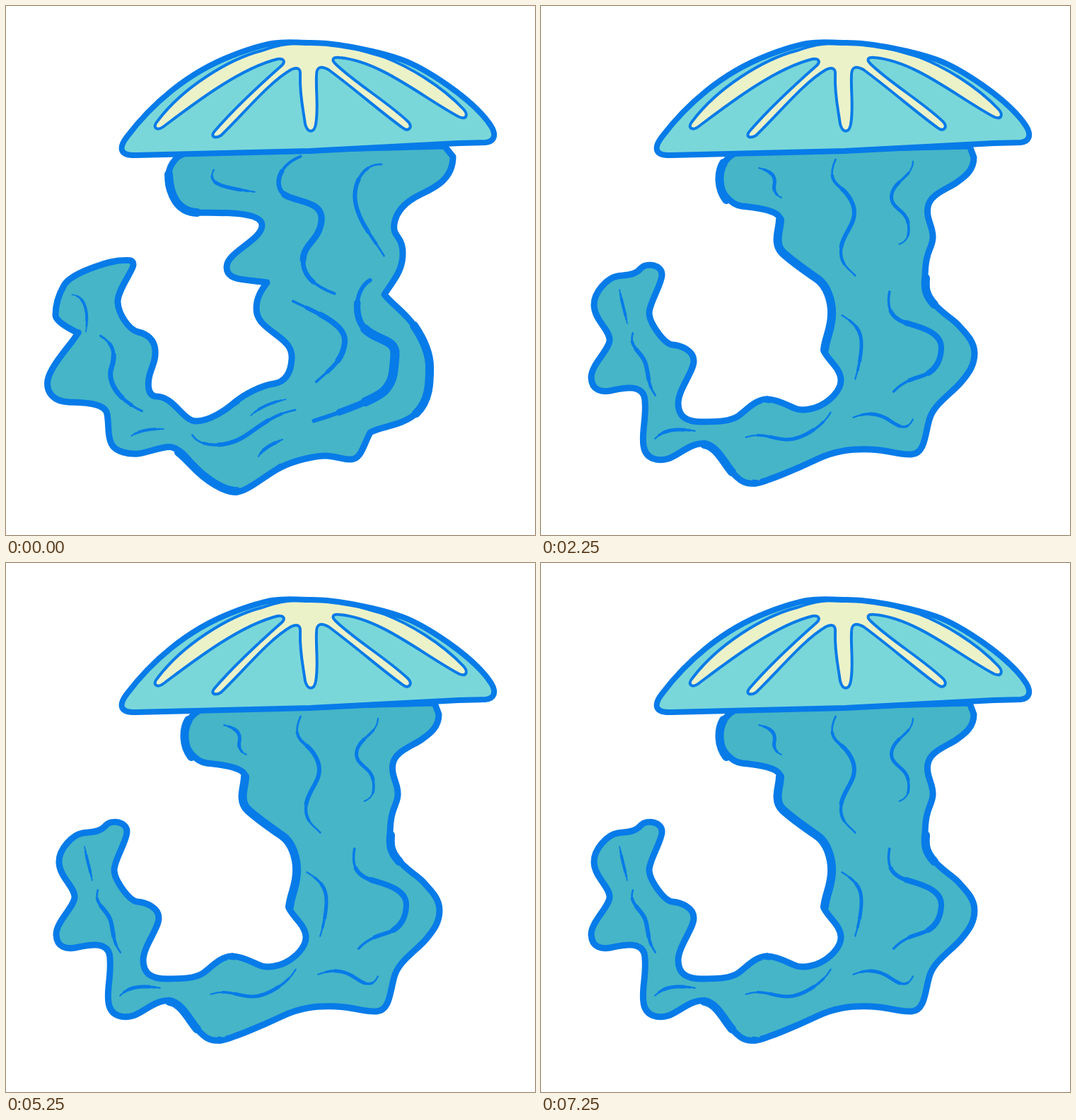
Recreate the animation shown at these times as an HTML page without scripts. Size 748 by 748 pixels, loop 7.5 s.

```html
<!DOCTYPE html>
<html lang="en">
<head>
<meta charset="utf-8">
<title>Jellyfish</title>
<style>
  html, body { margin: 0; width: 100%; height: 100%; overflow: hidden; background: #fff; }
  svg { display: block; width: 100%; height: 100%; }
  path { stroke: #077be8; stroke-linejoin: round; stroke-linecap: round; }
  .body { fill: #46b5c7; stroke-width: 9; }
  .seam { stroke: #46b5c7; stroke-width: 11; stroke-linecap: butt; }
  .heavy { fill: none; stroke-width: 12; }
  .bell { fill: #7ad7d9; }
  .rays { fill: #ecf2c8; stroke-width: 4; }
  .rim { fill: none; stroke-width: 8; }

  /* Folds taper: each line is stacked from thin and long to thick and short. */
  .folds path {
    fill: none;
    stroke-width: calc(var(--w) * var(--k) * 1px);
    stroke-dasharray: var(--len) calc(100 - var(--len));
    stroke-dashoffset: calc((var(--len) - 100) / 2);
  }
  .thin { --k: .45; --len: 99; }
  .mid { --k: .72; --len: 74; }
  .thick { --k: 1; --len: 48; }

  .pose { animation: swap 500ms step-end infinite; }
  .second { animation-delay: -250ms; }
  @keyframes swap { 0% { opacity: 1; } 50%, 100% { opacity: 0; } }
</style>
</head>
<body>
<svg viewBox="0 0 748 748">
  <defs>
    <path id="dome" d="M184 211C162 212 158 202 171 185C205 140 255 95 320 70S395 52 432 52S530 65 560 76S660 130 686 170C694 183 690 192 678 193L640 194L430 205Z"/>
    <g id="folds-a" class="folds">
      <path pathLength="100" style="--w:5" d="M294 231C284 250 300 256 352 263"/>
      <path pathLength="100" style="--w:9" d="M418 212C382 226 378 258 396 268S449 276 446 304S420 336 420 360S440 398 466 407"/>
      <path pathLength="100" style="--w:6" d="M532 224C506 222 490 250 494 277S514 320 535 354"/>
      <path pathLength="100" style="--w:8" d="M405 417C440 434 482 450 479 476S458 514 438 532"/>
      <path pathLength="100" style="--w:13" d="M516 387C494 398 490 438 507 456S552 470 550 494S548 530 536 543S470 576 434 587"/>
      <path pathLength="100" style="--w:4" d="M93 408C112 410 117 432 113 461"/>
      <path pathLength="100" style="--w:7" d="M133 466C154 478 155 495 149 512S156 556 193 573"/>
      <path pathLength="100" style="--w:4" d="M177 608C190 599 208 598 223 598"/>
      <path pathLength="100" style="--w:6" d="M263 606C275 626 314 624 338 608S378 577 410 571"/>
      <path pathLength="100" style="--w:4" d="M346 579C360 566 378 560 396 556"/>
      <path pathLength="100" style="--w:5" d="M357 637C364 624 380 618 391 613"/>
    </g>
    <g id="folds-b" class="folds">
      <path pathLength="100" style="--w:5" d="M308 229C328 234 332 242 330 252S333 268 340 271"/>
      <path pathLength="100" style="--w:6" d="M417 216C402 248 421 252 431 264S447 290 440 306S424 330 424 348S436 372 445 382"/>
      <path pathLength="100" style="--w:5" d="M526 219C526 242 500 246 496 266S516 288 519 306S518 333 506 337"/>
      <path pathLength="100" style="--w:8" d="M493 403C487 432 500 442 513 447S567 458 566 484S550 520 536 524S508 534 498 546"/>
      <path pathLength="100" style="--w:5" d="M425 437C450 452 454 464 453 482S448 516 444 528"/>
      <path pathLength="100" style="--w:4" d="M111 401C114 418 119 434 122 449"/>
      <path pathLength="100" style="--w:6" d="M130 462C123 484 143 488 148 506S150 534 162 551"/>
      <path pathLength="100" style="--w:5" d="M161 612C176 596 198 598 218 601"/>
      <path pathLength="100" style="--w:5" d="M289 610C312 602 326 612 346 613S398 596 410 574"/>
      <path pathLength="100" style="--w:5" d="M441 582C466 572 482 578 496 588S520 598 526 584"/>
    </g>
  </defs>

  <g class="pose">
    <path class="body" d="M256 207C236 213 229 230 229 246S243 291 270 292S362 289 362 310S312 348 312 369S340 386 369 391C361 402 354 412 354 428S366 453 381 464S405 483 404 499S398 531 379 534S337 549 324 560L387 653C408 642 438 636 452 636S476 642 489 641S505 622 515 603C530 594 560 594 580 576S600 532 600 511S590 471 577 452S545 421 535 408C546 390 561 376 561 350S546 327 549 308S568 275 587 266S632 245 632 213L620 198Z"/>
    <path class="body" d="M324 560C311 571 288 587 269 587S238 552 212 552C200 551 200 534 203 522S212 502 211 487S200 464 187 461S159 436 158 419S180 374 180 366S172 359 160 360S93 376 82 395S70 428 70 437S90 456 97 460S104 458 98 468S62 510 59 529S69 559 88 560S140 560 143 577S143 607 149 619S174 634 187 633S224 621 235 624C254 630 260 648 279 664S311 687 326 687S366 664 387 653Z"/>
    <path class="seam" d="M327 564L384 649"/>
    <path class="heavy" d="M230 238C231 268 243 291 270 292M244 631C256 640 264 652 279 664S311 686 326 686M577 452C590 471 599 490 599 511S599 558 580 576"/>
    <use href="#folds-a" class="thin"/>
    <use href="#folds-a" class="mid"/>
    <use href="#folds-a" class="thick"/>
  </g>

  <g class="pose second">
    <path class="body" d="M280 206C262 212 252 228 252 245S268 281 284 283S338 288 338 302S330 336 342 349S378 377 391 386S413 417 412 438S403 468 400 488C407 502 423 512 424 528S407 559 395 565S370 572 362 570S336 556 320 556L303 675C318 673 365 653 390 641S438 626 466 627S504 635 524 634S543 602 550 582S580 548 593 533S613 507 613 491S602 464 589 450S543 424 543 385S553 344 554 328S544 302 547 284S574 259 587 250S612 232 612 214L606 198Z"/>
    <path class="body" d="M320 556C304 556 292 570 280 579S246 588 227 588S194 582 194 562S216 517 216 502S198 480 186 479S153 448 153 434S171 393 171 380C171 366 150 362 141 371C133 381 121 380 108 382S74 404 75 424S97 458 97 472S70 508 71 526S86 546 98 544S147 530 147 560C149 585 142 602 145 622S167 644 180 640S214 616 231 619S260 648 270 659S288 677 303 675Z"/>
    <path class="seam" d="M319 561L304 670"/>
    <path class="heavy" d="M258 222C250 236 250 258 262 274M338 302C338 316 328 336 342 349S378 377 391 386S412 417 411 438S403 468 401 486M231 620C248 622 260 648 270 659M556 422C543 408 543 398 544 385"/>
    <use href="#folds-b" class="thin"/>
    <use href="#folds-b" class="mid"/>
    <use href="#folds-b" class="thick"/>
  </g>

  <use href="#dome" class="bell"/>
  <path class="rays" d="M362 63C315 75 250 115 214 163C206 172 214 177 222 171C262 141 330 88 384 75C392 74 396 78 390 84C356 114 320 148 295 177C288 185 296 188 304 183C340 148 372 108 403 90C412 86 417 88 416 98C415 125 420 145 423 167C427 181 436 179 438 167C442 145 438 120 439 98C439 86 445 84 456 90C494 118 530 150 562 173C570 178 575 171 569 164C540 136 495 110 466 82C459 75 463 72 472 73C530 78 590 130 641 157C651 161 654 154 647 146C615 112 570 86 534 72C500 62 470 52 432 52S380 57 362 63Z"/>
  <use href="#dome" class="rim"/>
</svg>
</body>
</html>
```
